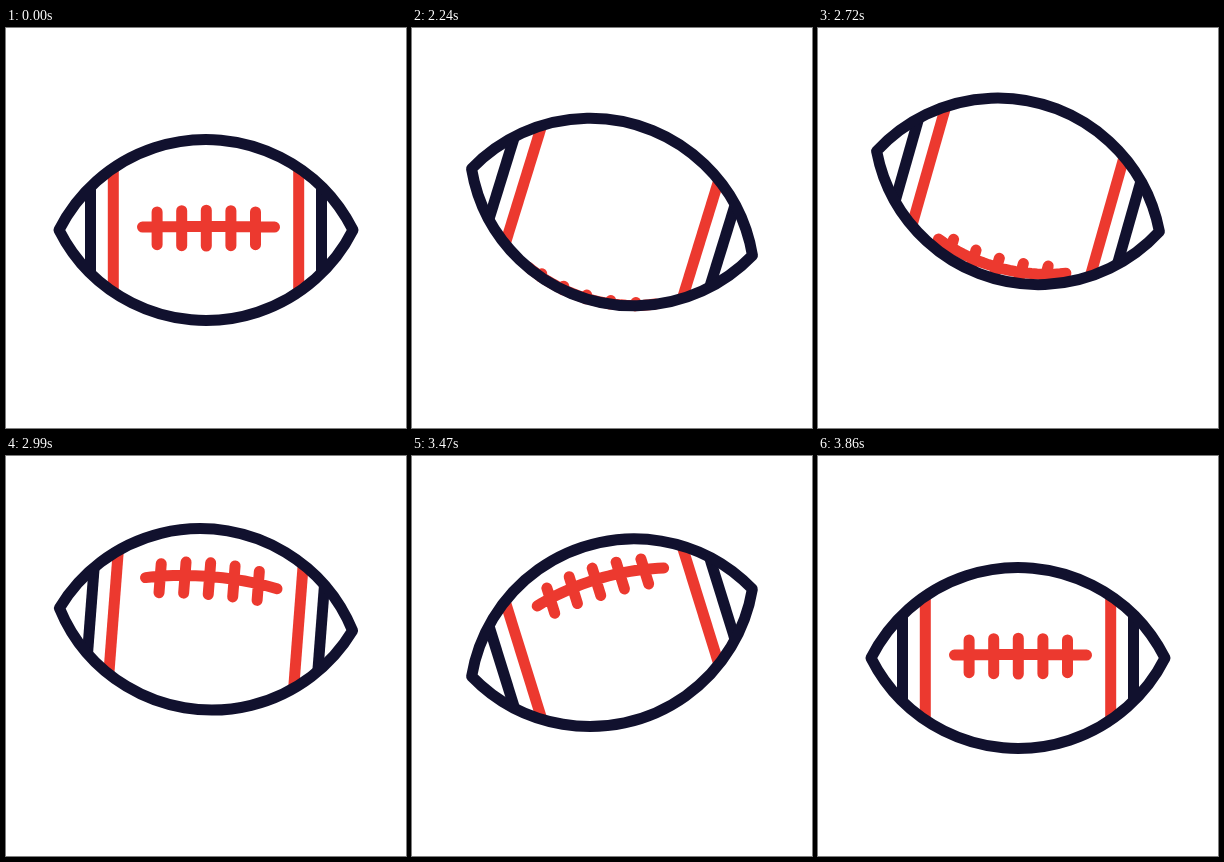
Recreate the animation shown at these times as an HTML page with a canvas. Size 400 px wide and 400 px high, loop 3.95 s.

```html
<!DOCTYPE html>
<html lang="en">
<head>
<meta charset="utf-8">
<title>Spinning football</title>
<style>
  html, body { margin: 0; width: 100%; height: 100%; overflow: hidden; background: #fff; }
  canvas { display: block; width: 400px; height: 400px; }
</style>
</head>
<body>
<canvas id="stage" width="400" height="400"></canvas>
<script>
const ctx = document.getElementById('stage').getContext('2d');

const LOOP = 3950, START = 2000, SPAN = 1860, STEP = 30;
const NAVY = '#11112e', RED = '#ec392f', LINE = 11;
const CX = 200, HALF_W = 147, HALF_H = 90.5;
const R = (HALF_W ** 2 + HALF_H ** 2) / (2 * HALF_H);
const RAD = Math.PI / 180;

// Poses of the throw: [ms since it starts, value].
const TILT = [[0, 0], [390, 24], [990, 4.4], [1260, -8.2], [1590, -19.6], [SPAN, 0]];
const HEIGHT = [[0, 202], [480, 165], [870, 163], [1260, 166.3], [1620, 187], [SPAN, 202]];
const SPIN = [[0, -2.2], [990, 331.6], [1260, 432], [1620, 530.5], [SPAN, 537.8]];

// Smooth curve without overshoot; starts at the given speed, ends at rest.
function ease(keys, t, speed = 0) {
  const last = keys.length - 1;
  const chord = k => (keys[k + 1][1] - keys[k][1]) / (keys[k + 1][0] - keys[k][0]);
  function slope(k) {
    if (k === 0) return speed;
    if (k === last) return 0;
    const a = chord(k - 1), b = chord(k);
    return a * b > 0 ? 2 * a * b / (a + b) : 0;
  }
  let i = 0;
  while (i < last - 1 && t > keys[i + 1][0]) i++;
  const [t0, v0] = keys[i], [t1, v1] = keys[i + 1];
  const d = t1 - t0, u = (t - t0) / d, w = 1 - u;
  return v0 + (v1 - v0) * u * u * (3 - 2 * u) +
    d * u * w * (slope(i) * w - slope(i + 1) * u);
}

// Half height of the ball at distance x from its middle.
const girth = x => Math.sqrt(R * R - x * x) - (R - HALF_H);

// Height on the ball's front at x for a roll angle in degrees.
function surface(x, deg) {
  const a = Math.max(-90, Math.min(90, deg));
  return girth(x) * Math.sin(a * RAD);
}

function stroke(color, cap, trace) {
  ctx.strokeStyle = color;
  ctx.lineCap = cap;
  ctx.beginPath();
  trace();
  ctx.stroke();
}

function stripe(x, color) {
  const h = girth(x);
  stroke(color, 'butt', () => {
    ctx.moveTo(x, -h);
    ctx.lineTo(x, h);
  });
}

function laces(deg) {
  stroke(RED, 'round', () => {
    for (let x = -63.5; x <= 68.5; x += 5.5) ctx.lineTo(x, surface(x, deg));
    for (let i = -2; i <= 2; i++) {
      const x = i * 24.6 + 0.3;
      ctx.moveTo(x, surface(x, deg - 10.4));
      ctx.lineTo(x, surface(x, deg + 12.4));
    }
  });
}

function outline() {
  const a = Math.asin(HALF_W / R), c = R - HALF_H, up = -Math.PI / 2;
  stroke(NAVY, 'round', () => {
    ctx.arc(0, c, R, up - a, up + a);
    ctx.arc(0, -c, R, -up - a, -up + a);
    ctx.closePath();
  });
}

function draw(t) {
  const s = Math.max(0, Math.min(SPAN, Math.floor((t - START) / STEP) * STEP));
  ctx.setTransform(1, 0, 0, 1, 0, 0);
  ctx.fillStyle = '#fff';
  ctx.fillRect(0, 0, 400, 400);
  ctx.translate(CX, ease(HEIGHT, s));
  ctx.rotate(ease(TILT, s, 0.03) * RAD);
  ctx.lineWidth = LINE;
  ctx.lineJoin = 'round';
  for (const side of [-1, 1]) {
    stripe(side * 92.7, RED);
    stripe(side * 115.5, NAVY);
  }
  // The laces leave at the bottom edge and return at the top.
  laces((ease(SPIN, s, 0.38) + 90) % 180 - 90);
  outline();
}

const begin = performance.now();
function tick() {
  draw((performance.now() - begin) % LOOP);
  requestAnimationFrame(tick);
}
tick();
</script>
</body>
</html>
```
